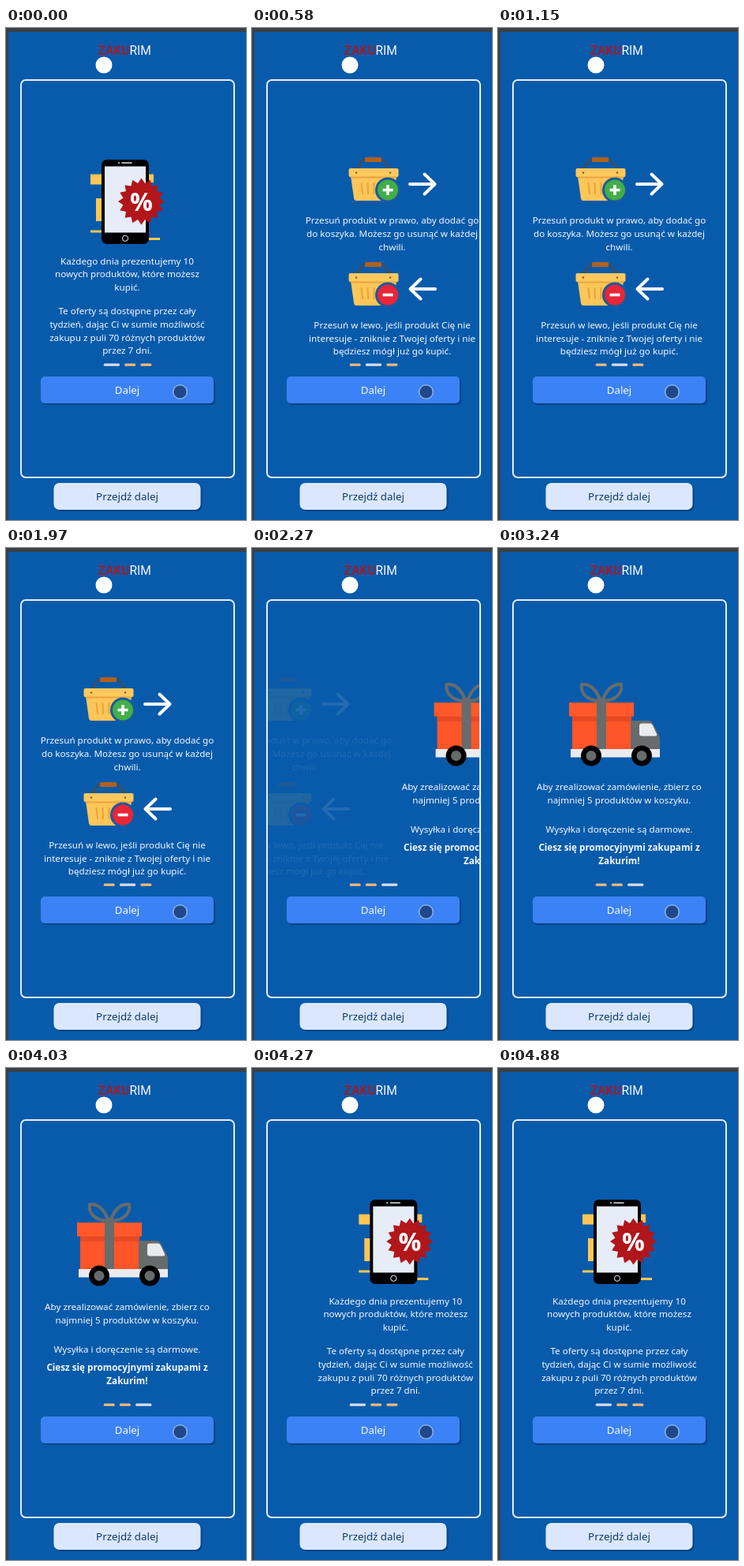
Recreate the animation shown at these times as an HTML page. Size 304 by 624 pixels, loop 4.91 s.

```html
<!DOCTYPE html>
<html lang="pl">
<head>
<meta charset="utf-8">
<style>
  html, body { margin: 0; height: 100%; overflow: hidden; background: #085bab; }
  svg { display: block; width: 304px; height: 624px; }
  text { font: 11.67px "Noto Sans", sans-serif; fill: #f4f8ff; text-anchor: middle; }
  .bold { font-weight: 700; }
  .button { font-size: 13.33px; }
  .logo { font: 15.6px Roboto, sans-serif; text-anchor: start; }
  .percent { font-size: 32px; font-weight: 600; fill: #fff; }
</style>
</head>
<body>
<svg viewBox="0 0 304 624">
  <defs>
    <clipPath id="inside"><rect x="20" y="67" width="268" height="502" rx="5"/></clipPath>
    <g id="basket">
      <path d="M107 180L117 167H142L152 180" fill="none" stroke="#454b57" stroke-width="2.6"/>
      <rect x="119" y="164" width="21" height="6" rx="1.5" fill="#b0621f"/>
      <path d="M101 188H159L155 216Q154.500 219 152 219H108Q105.500 219 105 216Z" fill="#fdc659"/>
      <rect x="98.500" y="178" width="63" height="11" rx="2" fill="#fdc85c"/>
      <path d="M101 189.500H159" stroke="#e9a640" stroke-width="2"/>
      <path d="M114.500 197L116 210M122.500 197L123 210M130.500 197V210M138 197L137.500 210" stroke="#e9a23a" stroke-width="2" stroke-linecap="round"/>
      <circle cx="108" cy="183.500" r="1.200" fill="#7b5a2c"/>
      <circle cx="151" cy="183.500" r="1.200" fill="#7b5a2c"/>
      <circle cx="148" cy="205.500" r="16" fill="#175a9f"/>
    </g>
    <path id="arrow" d="M176 198H207M194.500 185.500L207.500 198L194.500 210.500" fill="none" stroke="#fff" stroke-width="4" stroke-linecap="round" stroke-linejoin="round"/>
  </defs>

  <rect width="304" height="624" fill="#3c4047"/>
  <rect x="3" y="5" width="301" height="619" fill="#085bab"/>
  <text class="logo" x="116.500" y="34"><tspan fill="#b5141c" font-weight="500">ZAKU</tspan><tspan>RIM</tspan></text>
  <circle cx="124" cy="47" r="10.500" fill="#fff"/>
  <rect x="19" y="66" width="270" height="504" rx="6" fill="none" stroke="#e4edf8" stroke-width="2"/>

  <g clip-path="url(#inside)">
    <g class="slide">
      <path d="M107 185.500H187V196H181V198.500H107ZM114 216H122V245H114ZM107 256.500H122V259.500H107ZM180 266H195V269H180Z" fill="#fdc655"/>
      <rect x="121" y="167" width="60" height="107" rx="6.500"/>
      <rect x="125" y="175.500" width="52" height="84" fill="#e6edf8"/>
      <path d="M147 171H159M142.500 171H143.500" stroke="#dfe5ee" stroke-width="1.600" stroke-linecap="round"/>
      <circle cx="151" cy="266.800" r="3.600" fill="none" stroke="#e6edf8"/>
      <polygon id="badge" fill="#b1161b"/>
      <text class="percent" x="171.500" y="231.500">%</text>
    </g>

    <g class="slide">
      <use href="#basket"/>
      <circle cx="148" cy="205.500" r="13" fill="#42ae49"/>
      <path d="M141.500 205.500H154.500M148 199V212" stroke="#fff" stroke-width="3.600"/>
      <use href="#arrow"/>
      <use href="#basket" y="133"/>
      <circle cx="148" cy="338.500" r="13" fill="#e9253a"/>
      <path d="M141.500 338.500H154.500" stroke="#fff" stroke-width="3.600"/>
      <use href="#arrow" transform="matrix(-1 0 0 1 384 133)"/>
    </g>

    <g class="slide">
      <g fill="none" stroke="#676b6b" stroke-width="4">
        <path d="M130 194C124 178 115 172 106 173C104 183 112 194 130 194"/>
        <path d="M132 194C138 178 147 172 156 173C158 183 150 194 132 194"/>
      </g>
      <rect x="94" y="212" width="75" height="44" fill="#ff5528"/>
      <rect x="94" y="212" width="75" height="8" fill="#e64a24"/>
      <rect x="90" y="196" width="82" height="17.500" fill="#ff592b"/>
      <rect x="125" y="190" width="12" height="66" rx="3" fill="#676b6b"/>
      <path d="M168 256V219H191Q194 219 196 222L204 238Q205 240 205 242V256Z" fill="#676b6b"/>
      <path d="M182 222.500H193Q195 222.500 196 225L201 236Q202 238.500 199 238.500H182Q179 238.500 179 235.500V225.500Q179 222.500 182 222.500Z" fill="#e9ebee"/>
      <rect x="92" y="255" width="113" height="10.500" fill="#e9ebee"/>
      <circle cx="118" cy="263.500" r="13"/><circle cx="182" cy="263.500" r="13"/>
      <circle cx="118" cy="263.500" r="6.500" fill="#676b6b"/><circle cx="182" cy="263.500" r="6.500" fill="#676b6b"/>
    </g>
  </g>

  <g id="dots"><rect/><rect/><rect/></g>
  <rect x="46" y="444" width="219" height="34" rx="5" fill="#064583"/>
  <rect x="44" y="442" width="219" height="34" rx="5" fill="#3b82f6"/>
  <text class="button" x="153.500" y="464">Dalej</text>
  <circle cx="220.500" cy="461.500" r="8.800" fill="#204787" stroke="#86b3ee" stroke-width="1.500"/>
  <rect x="62.500" y="579" width="186" height="34" rx="7" fill="#064583"/>
  <rect x="60.500" y="577" width="186" height="34" rx="7" fill="#dbe7fe"/>
  <text class="button" x="153.500" y="598.500" style="fill:#0c3a6b">Przejdź dalej</text>
</svg>
<script>
const LOOP = 4910, STARTS = [347, 2127, 4045];
const ENTER = 1000, EXIT = 100, FADE = 160, STIFFNESS = 0.024;
const slides = [...document.querySelectorAll('.slide')];
const dots = [...document.querySelectorAll('#dots rect')];

const copy = [
  [[299.5, 'Każdego dnia prezentujemy 10'], [316.3, 'nowych produktów, które możesz'], [333, 'kupić.'],
   [363, 'Te oferty są dostępne przez cały'], [380, 'tydzień, dając Ci w sumie możliwość'],
   [396.8, 'zakupu z puli 70 różnych produktów'], [413.3, 'przez 7 dni.']],
  [[248, 'Przesuń produkt w prawo, aby dodać go'], [265, 'do koszyka. Możesz go usunąć w każdej'], [281.7, 'chwili.'],
   [381, 'Przesuń w lewo, jeśli produkt Cię nie'], [397.7, 'interesuje - zniknie z Twojej oferty i nie'],
   [414.4, 'będziesz mógł już go kupić.']],
  [[307, 'Aby zrealizować zamówienie, zbierz co'], [324, 'najmniej 5 produktów w koszyku.'],
   [360.7, 'Wysyłka i doręczenie są darmowe.'],
   [384, 'Ciesz się promocyjnymi zakupami z', 'bold'], [400.8, 'Zakurim!', 'bold']]
];
copy.forEach((lines, i) => lines.forEach(([y, words, style = '']) =>
  slides[i].insertAdjacentHTML('beforeend', `<text class="${style}" x="153.5" y="${y}">${words}</text>`)));

document.getElementById('badge').setAttribute('points', Array.from({ length: 32 }, (_, i) => {
  const r = i % 2 ? 23.5 : 29.5, a = i * Math.PI / 16;
  return `${171.5 + r * Math.sin(a)},${220 - r * Math.cos(a)}`;
}).join(' '));

function place(slide, x, opacity) {
  slide.setAttribute('transform', `translate(${x})`);
  slide.setAttribute('opacity', opacity);
}

function draw(now) {
  const t = now % LOOP;
  const step = STARTS.filter(s => t >= s).length;
  const active = step % 3, previous = (active + 2) % 3;
  const age = step ? t - STARTS[step - 1] : LOOP;
  // Critically damped spring: share of the way still to go.
  const left = (1 + STIFFNESS * age) * Math.exp(-STIFFNESS * age);

  slides.forEach((slide, i) => {
    if (i === active) place(slide, ENTER * left, 1);
    else if (i === previous) place(slide, -EXIT * (1 - left), Math.max(0, 1 - age / FADE));
    else place(slide, 0, 0);
  });

  let x = 123.7;
  dots.forEach((dot, i) => {
    const width = i === active ? 20.3 : 14;
    const attrs = { x, y: 425.5, width, height: 3.3, rx: 1.5, fill: i === active ? '#d6deea' : '#f2ba80' };
    for (const name in attrs) dot.setAttribute(name, attrs[name]);
    x += width + 6.2;
  });
}

const begin = performance.now();
(function frame() {
  draw(performance.now() - begin);
  requestAnimationFrame(frame);
})();
</script>
</body>
</html>
```
